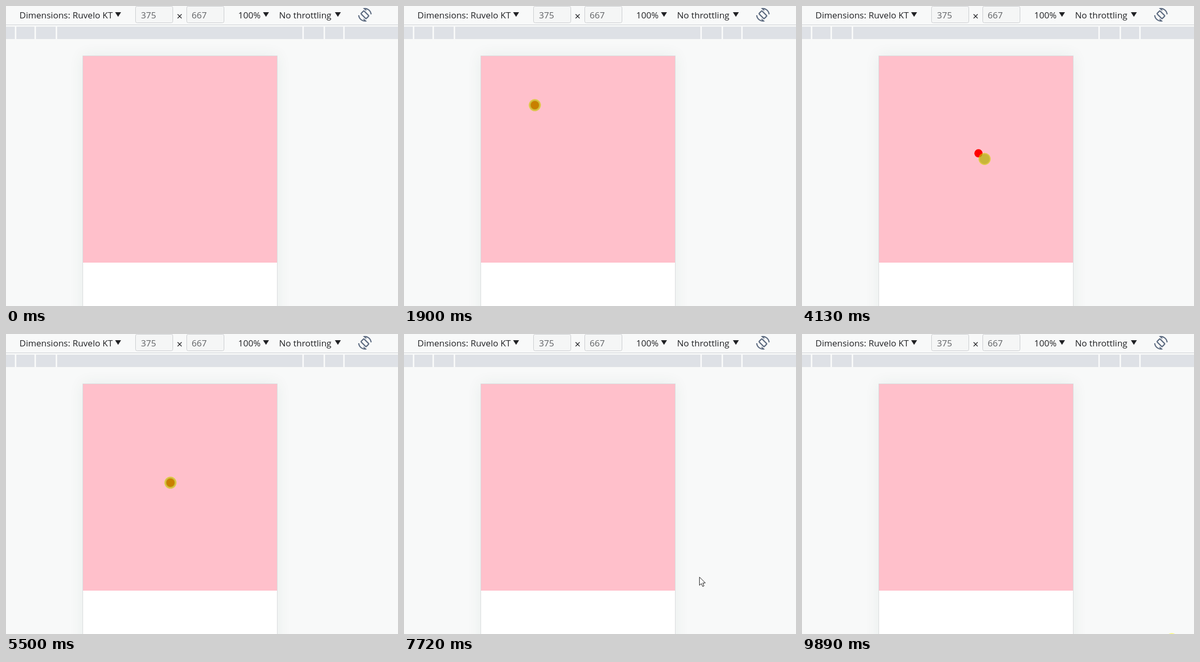
An HTML page with a canvas for the animation above (9960 ms loop, 758 px wide and 581 px high).

```html
<!DOCTYPE html>
<html lang="en">
<head>
<meta charset="utf-8">
<title>Touch drag demo</title>
<style>
  html, body { margin: 0; width: 100%; height: 100%; overflow: hidden; background: #f8f9f9; }
  canvas { position: absolute; left: 0; top: 0; }
  span {
    position: absolute; top: 0; white-space: pre; color: #202124;
    font: 17px/35px "Open Sans", "Noto Sans", sans-serif;
  }
  .field { color: #5f6164; }
  .times { font-size: 20px; line-height: 39px; }
</style>
</head>
<body>
<canvas id="stage" width="758" height="581"></canvas>
<span style="left:26px">Dimensions: Ruvelo KT</span>
<span class="field" style="left:261px">375</span>
<span class="times" style="left:330px">×</span>
<span class="field" style="left:359px">667</span>
<span style="left:449px">100%</span>
<span style="left:528px">No throttling</span>
<script>
const ctx = document.getElementById('stage').getContext('2d');
const LOOP = 9960;
const STEP = 70;      // the pointer is sampled this often
const DOT_LAG = 20;
const RELEASE = 200;  // the button stays down this long after a drag
const SCREEN = { x: 149, y: 97, w: 375, h: 484 };

const legs = [];
let rest = { x: 593, y: 517 };

function move(from, to, x, y, drag = false) {
  const end = { x, y };
  legs.push({ from, to, a: rest, b: end, drag });
  rest = end;
}
const drag = (from, to, x, y) => move(from, to, x, y, true);

move(70, 840, 260, 228);
move(1170, 1700, 253, 192);
drag(1900, 2620, 434, 376);
move(2810, 3230, 258.5, 249.5);
move(3230, 3780, 246, 198);
drag(3850, 4455, 487, 419);
move(4455, 4840, 333, 330);
move(4900, 5110, 279, 300);
move(5110, 5300, 318, 288);
drag(5500, 6050, 562, 296);
move(6710, 7120, 315, 275);
drag(7320, 7580, 614, 500);
move(7580, 8050, 414, 363);
move(8340, 8890, 273, 232);
drag(9160, 9600, 700, 605);
drag(9750, 9890, 715, 591);

function at({ from, to, a, b }, t) {
  const u = Math.min(1, Math.max(0, (t - from) / (to - from)));
  const s = u * u * (3 - 2 * u);
  return [a.x + (b.x - a.x) * s, a.y + (b.y - a.y) * s];
}

function rect(color, x, y, w, h) {
  ctx.fillStyle = color;
  ctx.fillRect(x, y, w, h);
}

function circle(color, x, y, r) {
  ctx.fillStyle = color;
  ctx.beginPath();
  ctx.arc(x, y, r, 0, Math.PI * 2);
  ctx.fill();
}

function polygon(color, points) {
  ctx.fillStyle = color;
  ctx.beginPath();
  points.forEach(p => ctx.lineTo(...p));
  ctx.closePath();
  ctx.fill();
}

function roundBox(x, y, w, h, r) {
  ctx.beginPath();
  ctx.roundRect(x, y, w, h, r);
}

function rotateIcon() {
  const color = '#5f6d82';
  ctx.save();
  ctx.translate(694, 17);
  ctx.strokeStyle = color;
  ctx.lineWidth = 2.3;
  for (let side = 0; side < 2; side++) {
    ctx.beginPath();
    ctx.arc(0, 0, 12, -1.75, -0.08);
    ctx.stroke();
    polygon(color, [[-4, -13], [1.5, -13], [3, -7]]);
    ctx.rotate(Math.PI);
  }
  ctx.rotate(-Math.PI / 4);
  roundBox(-4, -7, 8, 14, 1);
  ctx.stroke();
  ctx.restore();
}

function toolbar() {
  rect('#f8f9f9', 0, 0, 758, 581);
  rect('#cbced3', 0, 36, 758, 1);
  rect('#dee1e6', 0, 40, 758, 24);
  for (const x of [17, 55, 96]) {
    rect('#f8f9f9', x, 40, 3, 24);
    rect('#f8f9f9', 669 - x, 40, 3, 24);
  }
  for (const x of [250, 349]) {
    roundBox(x + 0.5, 0.5, 72, 32, 3);
    ctx.fillStyle = '#f5f6f6';
    ctx.fill();
    ctx.strokeStyle = '#c9cbce';
    ctx.lineWidth = 1;
    ctx.stroke();
  }
  for (const x of [211, 497, 636]) {
    polygon('#202124', [[x, 12], [x + 11.5, 12], [x + 5.75, 21]]);
  }
  rotateIcon();
}

function device() {
  const { x, y, w, h } = SCREEN;
  ctx.save();
  ctx.shadowColor = 'rgba(0, 80, 60, 0.07)';
  ctx.shadowBlur = 28;
  rect('#d9dbdd', x - 1, y - 1, w + 2, 669);
  ctx.restore();
  rect('#fff', x, y, w, h);
  rect('#ffc0cb', x, y, w, 400);
}

function scrollbar() {
  roundBox(517, 101, 4, 520, 2);
  ctx.fillStyle = 'rgba(128, 128, 128, 0.5)';
  ctx.fill();
}

function dot(x, y) {
  ctx.save();
  ctx.beginPath();
  ctx.rect(SCREEN.x, SCREEN.y, SCREEN.w, SCREEN.h);
  ctx.clip();
  circle('#f00', x, y, 8);
  ctx.restore();
}

function arrow(x, y) {
  ctx.save();
  ctx.translate(x, y);
  polygon('#fff', [[0, 0], [0, 16], [3.7, 12.6], [6.2, 18.2], [8.8, 17.1], [6.4, 11.5], [11.3, 11.3]]);
  ctx.strokeStyle = '#111';
  ctx.lineWidth = 1;
  ctx.stroke();
  ctx.restore();
}

// A touch circle over the device, a plain arrow beside it.
function pointer(x, y) {
  if (x > SCREEN.x + SCREEN.w) return arrow(x, y);
  circle('rgba(0, 0, 0, 0.27)', x, y, 11.5);
  circle('rgba(0, 0, 0, 0.22)', x, y, 9.7);
}

function draw(t) {
  toolbar();
  device();
  if (t >= 5900 && t < 6250) scrollbar();
  const leg = legs.filter(l => l.from <= t).pop();
  if (!leg) return;
  const stepped = t >= leg.to ? leg.to : t - (t - leg.from) % STEP;
  const [x, y] = at(leg, stepped);
  const pressed = leg.drag && t < leg.to + RELEASE;
  if (pressed) dot(...at(leg, stepped - DOT_LAG));
  pointer(x, y);
  if (pressed) circle('rgba(255, 255, 0, 0.5)', x, y, 11.8);
}

const start = performance.now();
function frame() {
  draw((performance.now() - start) % LOOP);
  requestAnimationFrame(frame);
}
frame();
</script>
</body>
</html>
```
